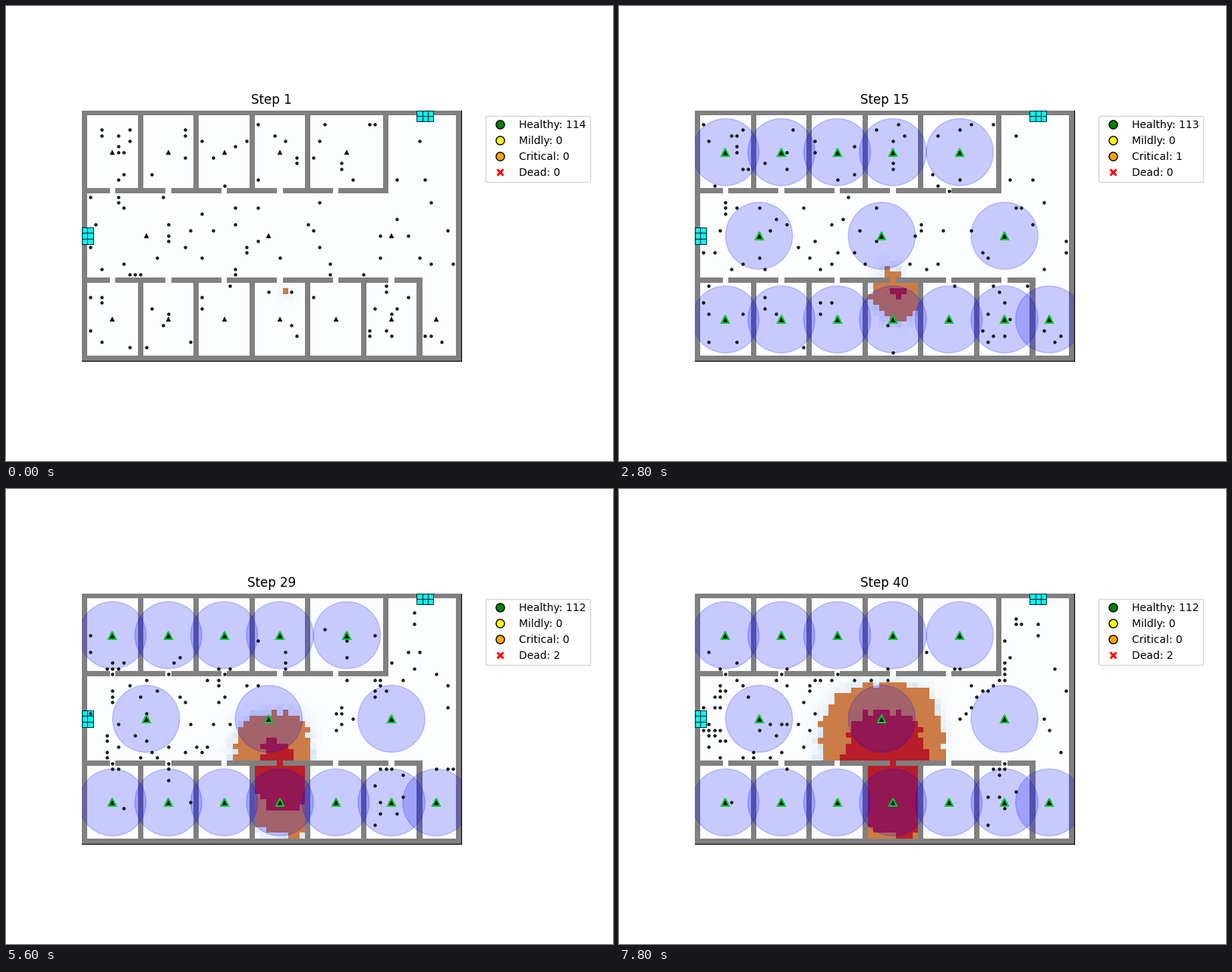
Write a matplotlib script that moves like this. It is 800 by 600 pixels and loops after 8 s.

```python
import random
from collections import deque

import matplotlib.pyplot as plt
import numpy as np
from matplotlib.animation import FuncAnimation
from matplotlib.lines import Line2D
from matplotlib.patches import Circle, Rectangle

COLS, ROWS, STEPS = 68, 45, 40
ALARM = 15
BURN = 10.5  # steps from catching fire to full blaze

FLOOR = np.array([252, 254, 255]) / 255
SMOKE = np.array([216, 229, 246]) / 255
WALL = np.array([128, 128, 128]) / 255
FLAME = np.array([204, 124, 70]) / 255
BLAZE = np.array([184, 29, 40]) / 255

SENSORS = ([(c, 7) for c in (5, 15, 25, 35, 47)]
           + [(c, 22) for c in (11, 33, 55)]
           + [(c, 37) for c in (5, 15, 25, 35, 45, 55, 63)])
LEFT_EXIT = [(c, r) for c in (0, 1) for r in (21, 22, 23)]
TOP_EXIT = [(c, r) for c in (60, 61, 62) for r in (0, 1)]

# first column, last column, first row, last row, people
ROOMS = [
    (1, 9, 2, 12, 10), (11, 19, 2, 12, 4), (21, 29, 2, 13, 5),
    (31, 39, 2, 12, 6), (41, 53, 1, 13, 8), (55, 66, 2, 28, 10),
    (1, 54, 15, 29, 39), (1, 9, 31, 42, 6), (11, 19, 31, 43, 5),
    (21, 29, 31, 42, 3), (41, 49, 31, 43, 1), (51, 59, 31, 43, 10),
    (61, 66, 38, 43, 3),
]
FIRE_ROOM = [(37, 38), (38, 40), (33, 32), (37, 32)]
SLOW_ROOM = (51, 59, 31, 43)


def build_walls():
    w = np.zeros((ROWS, COLS), bool)
    w[[0, -1], :] = True
    w[:, [0, -1]] = True
    w[14, :55] = True
    w[30, :61] = True
    for c in (10, 20, 30, 40, 54):
        w[:15, c] = True
    for c in (10, 20, 30, 40, 50, 60):
        w[30:, c] = True
    w[14, 5:46:10] = False
    w[30, 5:56:10] = False
    return w


def ignition_times():
    """Step at which each cell catches fire."""
    rng = np.random.default_rng(4)
    r, c = np.mgrid[:ROWS, :COLS]
    noise = rng.uniform(-1.4, 1.4, (ROWS, COLS))
    room = 1.5 + 2.5 * np.hypot((c - 36) * 1.1, r - 32) + noise
    dx = np.where(c < 35, 2.25 * (35 - c), 3.3 * (c - 35))
    hall = 10.5 + np.cbrt(dx ** 3 + (2.1 * abs(30 - r)) ** 3) + noise
    t = np.full((ROWS, COLS), 999.0)
    t[31:44, 31:40] = room[31:44, 31:40]
    t[15:30, 1:67] = hall[15:30, 1:67]
    t[30, 35] = 10.5
    t[32, 36] = 0.4
    return t


def neighbours(cell):
    c, r = cell
    for dc in (-1, 0, 1):
        for dr in (-1, 0, 1):
            if (dc or dr) and 0 <= c + dc < COLS and 0 <= r + dr < ROWS:
                yield c + dc, r + dr


def distances(goal):
    dist = {cell: 0 for cell in goal}
    queue = deque(goal)
    while queue:
        cell = queue.popleft()
        for n in neighbours(cell):
            if n not in dist and not walls[n[1], n[0]]:
                dist[n] = dist[cell] + 1
                queue.append(n)
    return dist


walls = build_walls()
ignite = ignition_times()
to_left, to_top = distances(LEFT_EXIT), distances(TOP_EXIT)


def simulate():
    """Positions of everyone still inside, one list per step."""
    rng = random.Random(11)
    people = list(FIRE_ROOM)
    pace = [0.5, 0.5, 0.9, 0.9]
    for c0, c1, r0, r1, count in ROOMS:
        cells = [(c, r) for c in range(c0, c1 + 1) for r in range(r0, r1 + 1)]
        people += rng.sample(cells, count)
        slow = (c0, c1, r0, r1) == SLOW_ROOM
        pace += [0.08 if slow else rng.uniform(0.35, 0.7) for _ in range(count)]
    route = [to_left if to_left[p] <= to_top[p] + 6 else to_top for p in people]
    inside = set(range(len(people)))
    history = [list(people)]

    for step in range(2, STEPS + 1):
        if step == 17:
            inside.discard(0)
        if step == 22:
            inside.discard(1)
        taken = {people[i] for i in inside}
        for i in sorted(inside):
            c, r = cell = people[i]
            dist = route[i]
            if dist[cell] == 0:
                inside.discard(i)
                taken.discard(cell)
                continue
            danger = ignite[r, c] < step + 4
            burning = ignite[r, c] < step
            if rng.random() > (1 if danger and i > 1 else pace[i]):
                continue
            free = [n for n in neighbours(cell) if n in dist and n not in taken
                    and (burning or ignite[n[1], n[0]] > step + 1)]
            if step >= ALARM or i in (2, 3):
                closer = [n for n in free if dist[n] < dist[cell]]
                free = closer or [n for n in free if dist[n] == dist[cell]]
            else:
                free = [n for n in free if dist[n] > 0 and n[1] not in (14, 30)]
            if free:
                taken.discard(cell)
                people[i] = rng.choice(free)
                taken.add(people[i])
        history.append([people[i] for i in sorted(inside)])
    return history


def floor_image(step):
    haze = np.exp(-np.clip(ignite - step, 0, 60) / 2.2)[..., None]
    img = FLOOR + (SMOKE - FLOOR) * haze
    img[ignite <= step] = FLAME
    img[ignite + BURN <= step] = BLAZE
    img[walls] = WALL
    return img


def tally(step):
    """Healthy, mildly hurt, critical and dead."""
    dead = (step >= 17) + (step >= 22)
    critical = int(step in (15, 16, 20, 21))
    return 114 - dead - critical, 0, critical, dead


history = simulate()

fig = plt.figure(figsize=(8, 6), dpi=100)
ax = fig.add_axes([0.125, 0.11, 0.625, 0.77])
ax.set_xlim(0, COLS)
ax.set_ylim(ROWS, 0)
ax.set_xticks([])
ax.set_yticks([])
ax.spines[["left", "top"]].set_visible(False)
floor = ax.imshow(floor_image(1), extent=(0, COLS, ROWS, 0),
                  interpolation="nearest", zorder=0)

for c, r in LEFT_EXIT + TOP_EXIT:
    ax.add_patch(Rectangle((c, r), 1, 1, fc="cyan", ec="black", lw=0.6, zorder=3))

centres = np.array(SENSORS) + 0.5
zones = [ax.add_patch(Circle(p, 6, color="blue", alpha=0.2, lw=1, zorder=4))
         for p in centres]
dots, = ax.plot([], [], "o", ms=2.1, mfc="green", mec="black", mew=1, zorder=5)
sensors, = ax.plot(*centres.T, "^", color="black", ms=5, zorder=6)

title = ax.set_title("Step 1")
LABELS = ("Healthy", "Mildly", "Critical", "Dead")
handles = [Line2D([0], [0], marker="o", color="w", mfc=colour, mec="black",
                  ms=8, label=name)
           for name, colour in zip(LABELS, ("green", "yellow", "orange"))]
handles.append(Line2D([0], [0], marker="X", color="w", mfc="red", ms=8,
                      label="Dead"))
for h, n in zip(handles, tally(1)):
    h.set_label(f"{h.get_label()}: {n}")
legend = ax.legend(handles=handles, loc="upper left", bbox_to_anchor=(1.05, 1))


def update(frame):
    step = frame + 1
    alarm = step >= ALARM
    floor.set_data(floor_image(step))
    dots.set_data(*(np.array(history[frame]) + 0.5).T)
    for zone in zones:
        zone.set_visible(alarm)
    sensors.set_markersize(7 if alarm else 5)
    sensors.set_markeredgecolor("#00c832" if alarm else "black")
    sensors.set_markeredgewidth(1.5 if alarm else 0.3)
    title.set_text(f"Step {step}")
    for text, name, n in zip(legend.get_texts(), LABELS, tally(step)):
        text.set_text(f"{name}: {n}")
    return floor, dots, sensors, title


anim = FuncAnimation(fig, update, frames=STEPS, interval=200, repeat=True)
plt.show()
```
